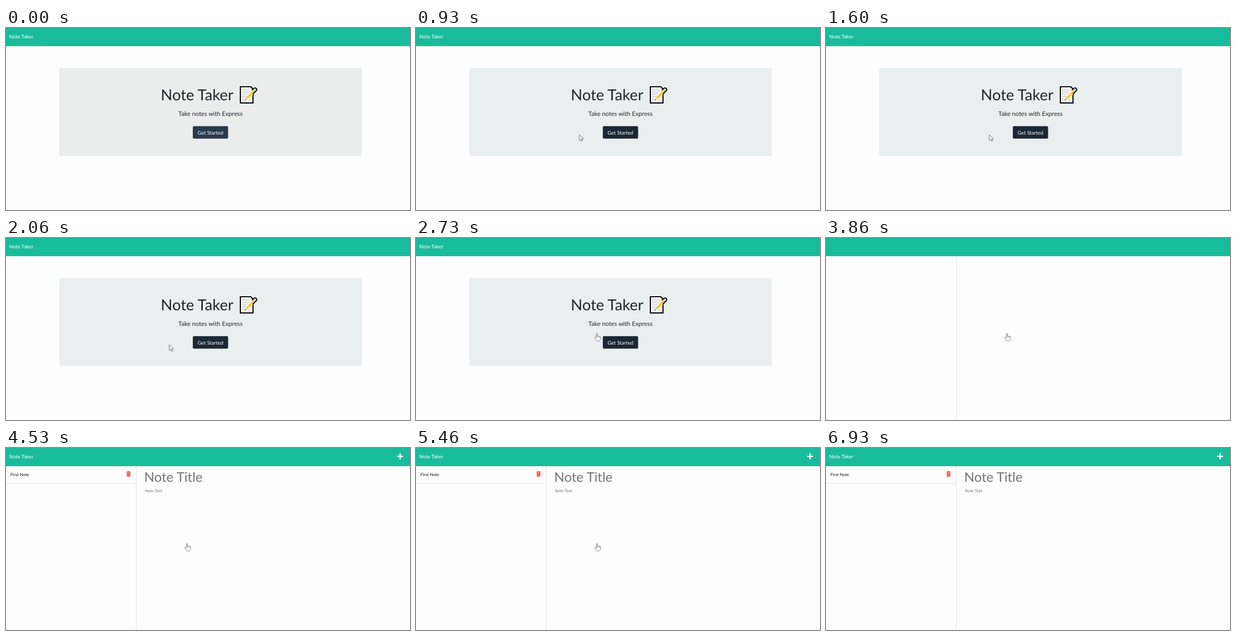
These frames come from a looping animation (774x350 px, 8000 ms). An HTML page:

```html
<!DOCTYPE html>
<html lang="en">
<head>
<meta charset="utf-8">
<title>Note Taker</title>
<style>
  html, body { margin: 0; width: 100%; height: 100%; overflow: hidden; background: #fdfdfd; }
  svg { display: block; width: 100%; height: 100%; }
  text { font-family: Lato, "Open Sans", sans-serif; text-rendering: geometricPrecision; }
  .mid { text-anchor: middle; }
</style>
</head>
<body>
<svg viewBox="0 0 774 350" xmlns="http://www.w3.org/2000/svg">
  <rect width="774" height="350" fill="#fdfdfd"/>
  <rect id="nav" width="774" height="35" fill="#18bc9c"/>
  <text id="brand" x="6" y="20.3" font-size="9.78" fill="#fff">Note Taker</text>

  <g id="home">
    <rect id="panel" x="102.2" y="77" width="579.4" height="169" rx="2"/>
    <text x="296.6" y="138.6" font-size="29.2" fill="#212529">Note Taker</text>
    <g id="memo" stroke-linejoin="round" stroke-linecap="round">
      <path d="M449 113H469L473.2 117.5V144.2H449Z" fill="#fff" stroke="#000" stroke-width="2.2"/>
      <path d="M452.5 117.5H465M452.5 121H468M452.5 124.5H465M452.5 128H462M452.5 131.5H460M452.5 135H457M452.5 138.5H456M464 138.5H469"
            fill="none" stroke="#a9a9a9" stroke-width="1.1"/>
      <path d="M457.2 139.2L459.6 133L474.6 117.8L479 122L463.6 137Z" fill="#fdc93d" stroke="#fff" stroke-width="1"/>
      <path d="M457.2 139.2L459.6 133.2L463.4 137Z" fill="#f3d3a6"/>
      <path d="M457.2 139.2L458.2 136.7L459.8 138.2Z" fill="#222"/>
      <path d="M471.5 119L475.6 115.6Q477.5 114.5 479.5 116.3Q481.2 118.3 480 120L473.5 126.8"
            fill="none" stroke="#000" stroke-width="2"/>
      <path d="M474.5 118L477 116.5L479 119L477.5 121Z" fill="#c9cdd0"/>
    </g>
    <text class="mid" x="391.8" y="169.2" font-size="11.74" fill="#212529">Take notes with Express</text>
    <rect id="ring" x="357" y="187.9" width="69.4" height="25.8" rx="3" fill="none" stroke="#8d98a2" stroke-width="1.7"/>
    <rect id="button" x="357.9" y="188.8" width="67.6" height="24" rx="2.5"/>
    <text class="mid" x="391.7" y="204.6" font-size="9.78" fill="#fff">Get Started</text>
  </g>

  <g id="notes">
    <path d="M249.5 35V350" stroke="#e2e4e5"/>
    <g id="content">
      <path d="M0 68H249" stroke="#dfe1e2"/>
      <text x="8.5" y="54.2" font-size="8.1" fill="#111">First Note</text>
      <g fill="none" stroke="#e74c3c">
        <path d="M230.6 46.7H239M233 46V45.5H236.6V46" stroke-width="1.3"/>
        <path d="M231.2 48.1H238.4L238 54.2Q237.9 55 237.2 55H232.4Q231.7 55 231.6 54.2Z" fill="#e74c3c" stroke="none"/>
        <path d="M233.1 49.3V53.7M234.8 49.3V53.7M236.5 49.3V53.7" stroke="#f6b5ad" stroke-width=".6"/>
      </g>
      <path d="M750.2 15.9H759.8M755 11.1V20.7" stroke="#fff" stroke-width="2.5" stroke-linecap="round"/>
      <text x="264.8" y="64.8" font-size="25.6" fill="#757575">Note Title</text>
      <text x="266" y="84.7" font-size="7.82" fill="#757575">Note Text</text>
    </g>
  </g>

  <path id="arrow" d="M.4 .4V11.3L3 8.9L4.9 12.9L6.7 12.1L4.9 8.2H8.4Z" fill="#fff" stroke="#444" stroke-width=".8" stroke-linejoin="round"/>
  <g id="hand" fill="#fff" stroke="#555" stroke-width=".8" stroke-linejoin="round">
    <path d="M3.9 8.6V1.5Q3.9 .5 4.9 .5Q5.8 .5 5.8 1.5V5.2Q7.3 4.4 7.9 5.7Q9.2 5 9.9 6.3Q11.6 5.8 11.7 7.6V10.4Q11.7 12.2 10.6 13.4Q9.6 15.2 7.4 15.2Q5 15.2 3.9 13.2L.7 9.2Q.1 8.1 1.2 7.6Q2.2 7.3 3.9 9.2Z"/>
    <path d="M5.8 5.4V8M7.9 5.8V8.2M9.9 6.4V8.4" fill="none" stroke-width=".6"/>
  </g>
</svg>
<script>
const LOOP = 8000;
const OPEN = 3860, LOADED = 4260;
const el = id => document.getElementById(id);
const clamp = v => Math.min(1, Math.max(0, v));
const span = (t, a, b) => clamp((t - a) / (b - a));
const ease = p => p * p * (3 - 2 * p);
const lerp = (a, b, p) => a + (b - a) * p;
const mix = (a, b, p) => `rgb(${a.map((v, i) => Math.round(lerp(v, b[i], p)))})`;
const show = (id, on) => el(id).setAttribute("display", on ? "inline" : "none");
const move = (id, x, y) => el(id).setAttribute("transform", `translate(${x} ${y})`);

function draw(t) {
  const home = t < OPEN;
  show("home", home);
  show("notes", !home);
  show("brand", home || t >= LOADED);
  show("content", t >= LOADED);
  show("ring", t >= 3800);

  const settle = span(t, 60, 860);
  el("panel").setAttribute("fill", mix([235, 236, 236], [233, 238, 238], settle));
  el("button").setAttribute("fill", mix([41, 58, 77], [26, 39, 52], span(t, 500, 700)));

  // The pointer comes in from the lower right, rests, then moves to the button.
  const enter = ease(settle), reach = ease(span(t, 2330, 2600));
  const onButton = t >= 2600;
  show("arrow", t >= 60 && !onButton);
  move("arrow", lerp(lerp(519, 312.5, enter), 342, reach), lerp(lerp(309, 205, enter), 183, reach));
  show("hand", onButton && t < 6200);
  move("hand", 341.8, 183.2);
  el("hand").setAttribute("opacity", t < 6130 ? 1 : 0.4);
}

function tick(now) {
  draw(now % LOOP);
  requestAnimationFrame(tick);
}
draw(0);
requestAnimationFrame(tick);
</script>
</body>
</html>
```
